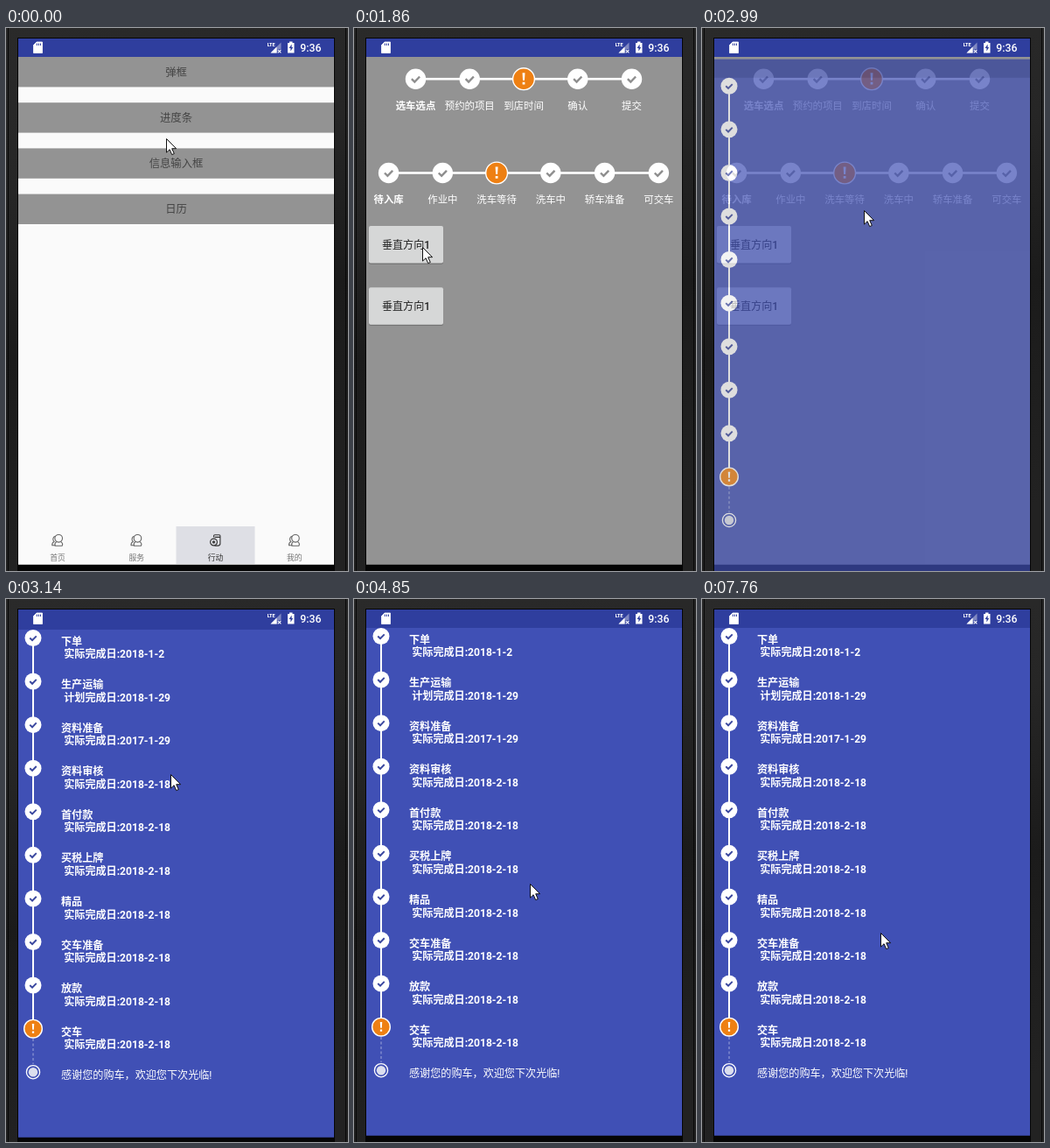
An HTML page for the animation above (8000 ms loop, 391x620 px).

```html
<!DOCTYPE html>
<html lang="zh-CN">
<head>
<meta charset="utf-8">
<style>
html, body { margin: 0; width: 391px; height: 620px; overflow: hidden; background: #000 }
svg { display: block; font: 12.1px Roboto, 'Noto Sans CJK SC', 'Noto Sans CJK', sans-serif }
.mid { text-anchor: middle }
.line { fill: none; stroke: #666; stroke-width: 1.1 }
</style>
</head>
<body>
<svg id="stage" width="391" height="620" viewBox="0 0 391 620"></svg>
<script>
const rect = (x, y, w, h, fill, extra = '') =>
  `<rect x="${x}" y="${y}" width="${w}" height="${h}" fill="${fill}" ${extra}/>`;
const text = (x, y, s, fill, extra = '') => `<text x="${x}" y="${y}" fill="${fill}" ${extra}>${s}</text>`;
const path = (d, extra) => `<path d="${d}" ${extra}/>`;
const at = (x, y, s) => `<g transform="translate(${x} ${y})">${s}</g>`;
const circle = (r, extra) => `<circle r="${r}" ${extra}/>`;
const bar = rect(14, 12, 361, 21, '#2f3e9e');
const page = color => rect(14, 12, 361, 601, color) + bar + rect(14, 612, 361, 1, '#000', 'opacity=".25"');

const done = (r, color) => circle(r, 'fill="#fff"') +
  path('M-4.6 0l3.4 3.3 5.8-6', `fill="none" stroke="${color}" stroke-width="2.4" transform="scale(${r / 11.7})"`);
const alert = r => circle(r, 'fill="#ee8013" stroke="#fff" stroke-width="1.4"') +
  path('M-1.5-7h3l-.5 8.5h-2zM-1.4 3.6h2.8v2.8h-2.8z', `fill="#fff" transform="scale(${r / 12.6})"`);

function listScreen() {
  const rows = ['弹框', '进度条', '信息输入框', '日历'].map((s, i) =>
    rect(14, 33 + i * 52.2, 361, 34.4, '#939393') +
    text(194.5, 54.6 + i * 52.2, s, '#444', 'class="mid" font-size="12.35"'));
  const person = circle(4.3, 'class="line" cx="1.2" cy="-2.2"') +
    path('M-2.6-4.8a3.6 3.6 0 0 0-1.4 6.2q-2.6 1.2-2.2 4.4h4M-1.3 1.6q-2.6 1.8-1.6 4.6h8q1.6-2.6-1.4-4.6', 'class="line"');
  const wallet = path('M-2-3.5v-1.5q0-1.2 1.2-1.2h5q1.2 0 1.2 1.2v8.5q0 2.6-2.6 2.6H-1M-1-3.6h6', 'class="line" style="stroke:#333"') +
    circle(3.9, 'class="line" cx="-2" cy="2" style="stroke:#333"') + circle(1.7, 'cx="-2" cy="2" fill="#444"');
  const tabs = ['首页', '服务', '行动', '我的'].map((s, i) => {
    const x = 59 + i * 90.25, on = i == 2;
    return (on ? rect(194.5, 569, 90, 43, '#dedfe5') : '') + at(x, 585, on ? wallet : person) +
      text(x, 608, s, on ? '#333' : '#777', 'class="mid" font-size="8.8"');
  });
  return page('#fafafa') + rows.join('') + tabs.join('');
}

function stepRow(x, y, labels) {
  const gap = 61.75;
  return rect(x, y - 1.3, gap * (labels.length - 1), 2.6, '#fff') + labels.map((s, i) =>
    at(x + i * gap, y, i == 2 ? alert(12.4) : done(11.7, '#8e8e8e')) +
    text(x + i * gap, y + 34.6, s, '#fff', `class="mid" font-size="11.4" font-weight="${i ? 400 : 700}"`)).join('');
}

function stepsScreen() {
  const button = y => rect(17, y + 1.2, 85, 42.5, '#666', 'rx="2" opacity=".7"') +
    rect(17, y, 85, 42.5, '#d6d7d7', 'rx="2"') + text(59.5, y + 26, '垂直方向1', '#222', 'class="mid" font-weight="500"');
  return page('#939393') +
    stepRow(70.5, 58.2, ['选车选点', '预约的项目', '到店时间', '确认', '提交']) +
    stepRow(39.6, 165.5, ['待入库', '作业中', '洗车等待', '洗车中', '轿车准备', '可交车']) +
    button(226) + button(296.3);
}

function timelineScreen() {
  const gap = 49.57, top = 42.5;
  const names = ['下单', '生产运输', '资料准备', '资料审核', '首付款', '买税上牌', '精品', '交车准备', '放款', '交车'];
  const dates = ['2018-1-2', '2018-1-29', '2017-1-29'];
  const marks = names.map((_, i) => at(31, top + i * gap, i == 9 ? alert(10.3) : done(9.5, '#3a479f')));
  const labels = names.map((s, i) => text(63, 50.6 + i * gap, s, '#fff') +
    text(66.2, 65.1 + i * gap, `${i == 1 ? '计划' : '实际'}完成日:${dates[i] || '2018-2-18'}`, '#fff'));
  return page('#4050b5') + rect(30, top, 2, 9 * gap, '#fff') +
    path('M31 500v29', 'stroke="#8f99d4" stroke-width="1.2" stroke-dasharray="3 2.5"') + marks.join('') +
    at(31, 538.2, circle(7.6, 'fill="none" stroke="#fff" stroke-width="1.3"') + circle(5.2, 'fill="#dcdfee"')) +
    `<g id="labels"><g font-weight="700">${labels.join('')}</g>` +
    text(63, 546.3, '感谢您的购车，欢迎您下次光临!', '#fff') + '</g>';
}

const statusIcons =
  path('M35 16h6.5v12.5h-10v-9z', 'fill="#fff" stroke="#fff" stroke-linejoin="round" stroke-width=".8"') +
  path('M35.3 17.5v2.5M37.4 17.5v2.5M39.5 17.5v2.5', 'stroke="#2f3e9e"') +
  path('M302.5 28.5l12-12v12z', 'fill="#8189c2"') + path('M302.5 28.5l7-7v7z', 'fill="#fff"') +
  path('M310.3 24.2h5v5h-5z', 'fill="#2f3e9e"') +
  path('M310.8 24.8l3.6 3.6M314.4 24.8l-3.6 3.6', 'stroke="#fff" stroke-width="1.1"') +
  text(298.7, 20.8, 'LTE', '#fff', 'font-size="5.4" font-weight="900"') +
  path('M322 17h2v-1.5h3.5v1.5h2v11.5h-7.5z', 'fill="#fff"') +
  path('M326.6 18.5l-3 4.6h1.8v3.4l2.8-4.6h-1.6z', 'fill="#2f3e9e"') +
  text(336.3, 27, '9:36', '#fff', 'font-size="12.3" font-weight="500"');

const phone = `<linearGradient id="edge" x2=".15" y2="1">
  <stop stop-color="#2a2a2a"/><stop offset=".3" stop-color="#262626"/><stop offset=".6" stop-color="#1b1b1b"/><stop offset="1" stop-color="#222"/>
  </linearGradient><clipPath id="glass">${rect(14, 12, 361, 608, '#000')}</clipPath>` +
  rect(0, 0, 391, 620, 'url(#edge)') + rect(2, 0, 1, 620, '#080808') + rect(388, 0, 1, 620, '#080808') +
  rect(13, 11, 363, 609, '#050505');

const stage = document.getElementById('stage');
stage.innerHTML = phone + `<g clip-path="url(#glass)">${listScreen()}<g id="steps">${stepsScreen()}</g>` +
  `<g id="timeline">${timelineScreen()}</g></g>${statusIcons}` +
  path('M.5.5v15.6l3.6-3.4 2.6 5.9 2.6-1.1-2.6-5.8h4.9z', 'id="cursor" fill="#fff" stroke="#111" stroke-width="1"');
const [steps, timeline, labels, cursor] =
  ['steps', 'timeline', 'labels', 'cursor'].map(id => document.getElementById(id));

const ticks = [[0, 0, 1], [150, 300, 2], [1020, 1020, 1], [1170, 1860, 6], [2260, 2830, 5], [2990, 3270, 3],
  [3420, 3690, 3], [3840, 4350, 5], [4470, 5410, 8], [5560, 5980, 4], [6380, 7340, 8], [7460, 7760, 3]]
  .flatMap(([a, b, n]) => Array.from({ length: n }, (_, i) => a + (b - a) * i / (n - 1 || 1)));

// Pointer route: time, x, y
const route = [[0, 183, 126], [300, 189, 107], [1170, 189, 107], [1860, 78, 250], [2550, 78, 250], [2830, 148, 226],
  [2990, 185, 208], [3270, 190, 192], [3420, 170, 300], [3690, 194, 514], [3840, 205, 568], [4350, 227, 427],
  [4870, 192, 290], [5010, 205, 155], [5410, 227, 427], [5840, 138, 29], [6380, 301, 122], [6930, 260, 575],
  [7340, 238, 302], [7760, 204, 381]];

function pointerAt(t) {
  const i = Math.max(1, route.findIndex(p => p[0] >= t));
  const [a, b] = [route[i - 1], route[i]], k = (t - a[0]) / (b[0] - a[0]);
  return [1, 2].map(n => a[n] + (b[n] - a[n]) * k);
}

function place(el, shown, dy, alpha) {
  el.style.display = shown ? '' : 'none';
  el.setAttribute('transform', `translate(0 ${dy})`);
  el.setAttribute('opacity', alpha);
}

function frame() {
  const now = performance.now() % 8000;
  const t = ticks.findLast(tick => tick <= now);
  place(steps, t >= 1020, t < 1170 ? 3.6 : 0, 1);
  place(timeline, t >= 2990, t < 3100 ? 23.8 : t < 3200 ? 2 : 0, t < 3100 ? .7 : 1);
  labels.style.display = t < 3100 ? 'none' : '';
  cursor.style.display = t >= 5980 && t < 6380 ? 'none' : '';
  cursor.setAttribute('transform', `translate(${pointerAt(t).map(Math.round)})`);
  requestAnimationFrame(frame);
}
frame();
</script>
</body>
</html>
```
